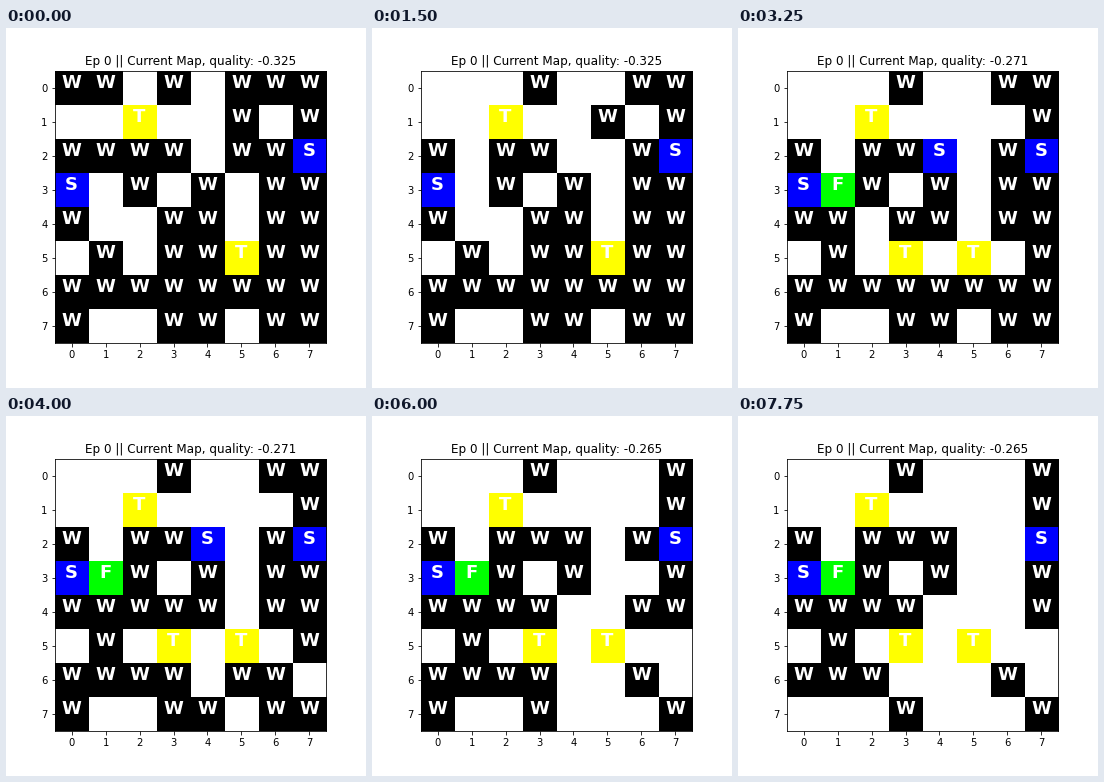
These frames come from a looping animation (360 px wide and 360 px high, 8 s). A matplotlib script:

```python
import numpy as np
import matplotlib.pyplot as plt
from matplotlib.animation import FuncAnimation

SIZE = 8
FRAME_MS = 250
FRAMES = 32
HOLD = 2  # frames shown before the first edit

START = """
WW.W.WWW
..T..W.W
WWWW.WWS
S.W.W.WW
W..WW.WW
.W.WWTWW
WWWWWWWW
W..WW.WW
""".split()

# One edit per frame: row, column, new tile
EDITS = """
05. 21. 00. 25. 01.
15. 53T 31F 54.
56. 41W 24S 64. 42W 67.
74. 24W 57. 44.
36. 65. 06. 76.
70S 70.
26. 54W 54. 46. 63.
""".split()

COLORS = {
    ".": (255, 255, 255),
    "W": (0, 0, 0),
    "S": (0, 0, 255),
    "T": (255, 255, 0),
    "F": (0, 255, 0),
}


def grid_at(frame):
    grid = [list(row) for row in START]
    for row, col, tile in EDITS[:max(0, frame - HOLD + 1)]:
        grid[int(row)][int(col)] = tile
    return grid


def quality(grid):
    tiles = sum(grid, [])
    return -0.325 + 0.06 * ("F" in tiles) - 0.006 * (tiles.count("S") - 2)


def to_image(grid):
    return np.array([[COLORS[t] for t in row] for row in grid], dtype=np.uint8)


fig, ax = plt.subplots(figsize=(5, 5), dpi=72, facecolor="white")
fig.subplots_adjust(left=0.125, right=0.9, bottom=0.125, top=0.88)
plt.rcParams["font.family"] = "DejaVu Sans"

image = ax.imshow(to_image(grid_at(0)), interpolation="nearest")
ax.set_xticks(range(SIZE))
ax.set_yticks(range(SIZE))
ax.tick_params(labelsize=10)
title = ax.set_title("", fontsize=12)
labels = [[ax.text(col, row, "", color="white", fontsize=18,
                   fontweight="bold", ha="center")
           for col in range(SIZE)] for row in range(SIZE)]


def update(frame):
    grid = grid_at(frame)
    image.set_data(to_image(grid))
    for label_row, tile_row in zip(labels, grid):
        for label, tile in zip(label_row, tile_row):
            label.set_text(tile.replace(".", ""))
    title.set_text(f"Ep 0 || Current Map, quality: {quality(grid):.3f}")
    return [image, title]


anim = FuncAnimation(fig, update, frames=FRAMES, interval=FRAME_MS,
                     repeat=True, repeat_delay=0, blit=False)
plt.show()
```
